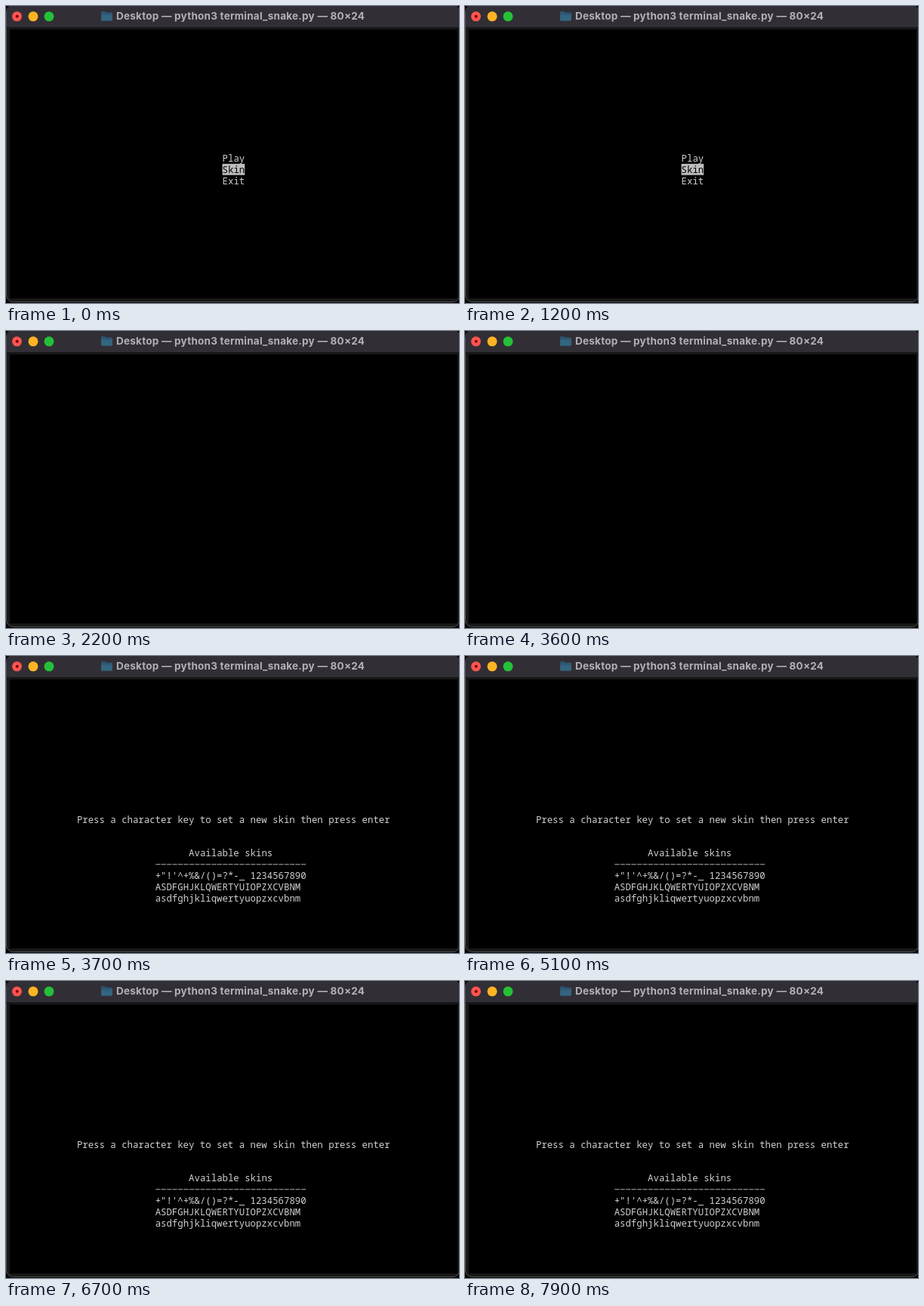
Write an HTML page that moves like this. It is 600 by 393 pixels and loops after 8000 ms.

```html
<!DOCTYPE html>
<html lang="en">
<head>
<meta charset="utf-8">
<title>Terminal menu</title>
<style>
  html, body { margin: 0; width: 100%; height: 100%; overflow: hidden; background: #000; }
  svg { display: block; width: 100vw; height: 100vh; }
  .title { font: 700 13.5px Inter, sans-serif; letter-spacing: 0.24px; fill: #b3b1b5; }
  .cell { font: 12.35px "Noto Sans Mono", monospace; fill: #d0d0d0; white-space: pre; }
  .cell.on { fill: #000; }
</style>
</head>
<body>
<svg id="stage" viewBox="0 0 600 393">
  <rect width="600" height="393" fill="#050505"/>
  <rect x="0.5" y="-0.5" width="600.5" height="392" rx="9" fill="#181818" stroke="#505050"/>
  <path d="M0 28.4V8q0-8 8-8H593q8 0 8 8V28.4Z" fill="#322e35"/>
  <path d="M0.5 8V28" stroke="#4b484e"/>
  <path d="M1 28.8H600" stroke="#0f0e10" stroke-width="0.8"/>
  <rect x="5" y="31" width="593" height="356" fill="#000"/>
  <circle cx="14.5" cy="13.8" r="6.5" fill="#fc544e"/>
  <circle cx="14.7" cy="13.8" r="2" fill="#780808"/>
  <circle cx="36" cy="13.8" r="6.5" fill="#fdb324"/>
  <circle cx="57" cy="13.8" r="6.5" fill="#24c138"/>
  <path d="M126 8.2q0-1.2 1.2-1.2h3.6l1.6 1.4h7q1.4 0 1.4 1.4v8.4q0 1.3-1.3 1.3h-12.2q-1.3 0-1.3-1.3z" fill="#2b546f"/>
  <path d="M126 10.4h14.8v7.8q0 1.3-1.3 1.3h-12.2q-1.3 0-1.3-1.3z" fill="#34657f"/>
  <path d="M126.5 11.6h13.8" stroke="#2b546f" stroke-width="0.8"/>
  <text class="title" x="146" y="18.2">Desktop — python3 terminal_snake.py — 80×24</text>
  <g id="menu"></g>
  <g id="skins"></g>
</svg>
<script>
const NS = "http://www.w3.org/2000/svg";
const LOOP = 8000;
const COL = 7.41, ROW = 14.87, LEFT = 5, TOP = 31;
const menu = document.getElementById("menu");
const skins = document.getElementById("skins");

function add(parent, tag, attrs, text = "") {
  const el = document.createElementNS(NS, tag);
  for (const key in attrs) el.setAttribute(key, attrs[key]);
  el.textContent = text;
  return parent.appendChild(el);
}

const colX = col => LEFT + col * COL;
const rowY = row => TOP + row * ROW;

function print(parent, col, row, text) {
  return add(parent, "text", { class: "cell", x: colX(col), y: rowY(row) + 11.2 }, text);
}

const bar = add(menu, "rect", { x: colX(38), width: 4 * COL, height: ROW, fill: "#bdbdbd" });
const items = ["Play", "Skin", "Exit"].map((label, i) => print(menu, 38, 11 + i, label));

print(skins, 12, 12, "Press a character key to set a new skin then press enter");
print(skins, 32, 15, "Available skins");
add(skins, "path", {
  d: `M${colX(26) + 0.6} ${rowY(16) + 6.8}h${27 * COL - 1.2}`,
  stroke: "#b0b0b0", "stroke-width": 1.1, "stroke-dasharray": `6.2 ${COL - 6.2}`
});
print(skins, 26, 17, "+\"!'^+%&/()=?*-_ 1234567890");
print(skins, 26, 18, "ASDFGHJKLQWERTYUIOPZXCVBNM");
print(skins, 26, 19, "asdfghjkliqwertyuopzxcvbnm");

const show = (el, on) => el.setAttribute("visibility", on ? "visible" : "hidden");

function draw(t) {
  const picked = t >= 1400 && t < 1700 ? 2 : 1;
  show(menu, t < 2100);
  show(skins, t >= 3700);
  bar.setAttribute("y", rowY(11 + picked) - 0.6);
  items.forEach((item, i) => item.classList.toggle("on", i === picked));
}

const start = performance.now();
function tick() {
  draw((performance.now() - start) % LOOP);
  requestAnimationFrame(tick);
}
draw(0);
requestAnimationFrame(tick);
</script>
</body>
</html>
```
